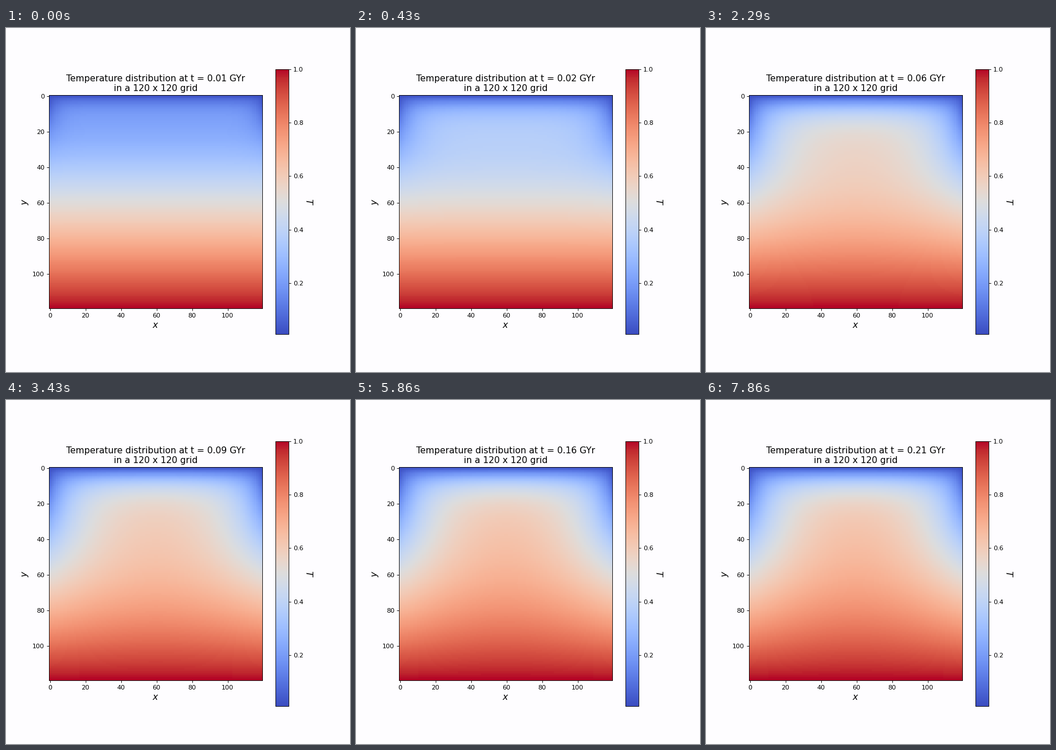
Animation, 600 px wide and 600 px high, one loop 8 s. Source, as a matplotlib script:

```python
import numpy as np
import matplotlib.pyplot as plt
from matplotlib.animation import FuncAnimation

N = 120                      # grid cells per side
FRAMES = 56
LOOP_MS = 8000
T_START, T_STEP = 0.0059, 0.00367   # GYr
DIFFUSION_STEP = 56          # diffusivity times time per frame, in cells squared
HEAT, DEPTH = 0.72, 11       # strength and decay depth of the heat source

plt.rcParams["font.family"] = "DejaVu Sans"

# Heating of the interior as a sine series that vanishes on all four walls.
span = N - 1
modes = np.arange(1, span)
k = modes * np.pi / span
sines = np.sin(np.outer(np.arange(N), k))
sign = (-1.0) ** modes
across = 2 * (1 - sign) / (np.pi * modes)
down = 2 / span * k * (1 - sign * np.exp(-span / DEPTH)) / (k**2 + DEPTH**-2)
decay = k[:, None] ** 2 + k[None, :] ** 2
steady = HEAT / DEPTH**2 * np.outer(down, across) / decay
conduction = np.repeat((np.arange(N) + 1)[:, None] / N, N, axis=1)


def temperature(frame):
    grown = 1 - np.exp(-decay * DIFFUSION_STEP * (frame + 1))
    return conduction + sines @ (steady * grown) @ sines.T


def title_text(frame):
    t = T_START + T_STEP * frame
    return f"Temperature distribution at t = {t:.2f} GYr\nin a {N} x {N} grid"


fig, ax = plt.subplots(figsize=(7.5, 7.5), dpi=80, facecolor="#fefdff")
image = ax.imshow(temperature(0), cmap="coolwarm", vmin=1 / N, vmax=1,
                  interpolation="nearest")
bar = fig.colorbar(image, ax=ax)
bar.set_label("$T$", fontsize=14, rotation=270, labelpad=15)
ax.set_xlabel("$x$", fontsize=14)
ax.set_ylabel("$y$", fontsize=14)
title = ax.set_title(title_text(0), fontsize=14)


def update(frame):
    image.set_data(temperature(frame))
    title.set_text(title_text(frame))
    return image, title


anim = FuncAnimation(fig, update, frames=FRAMES, interval=LOOP_MS / FRAMES,
                     repeat=True, repeat_delay=0, blit=False)
plt.show()
```
